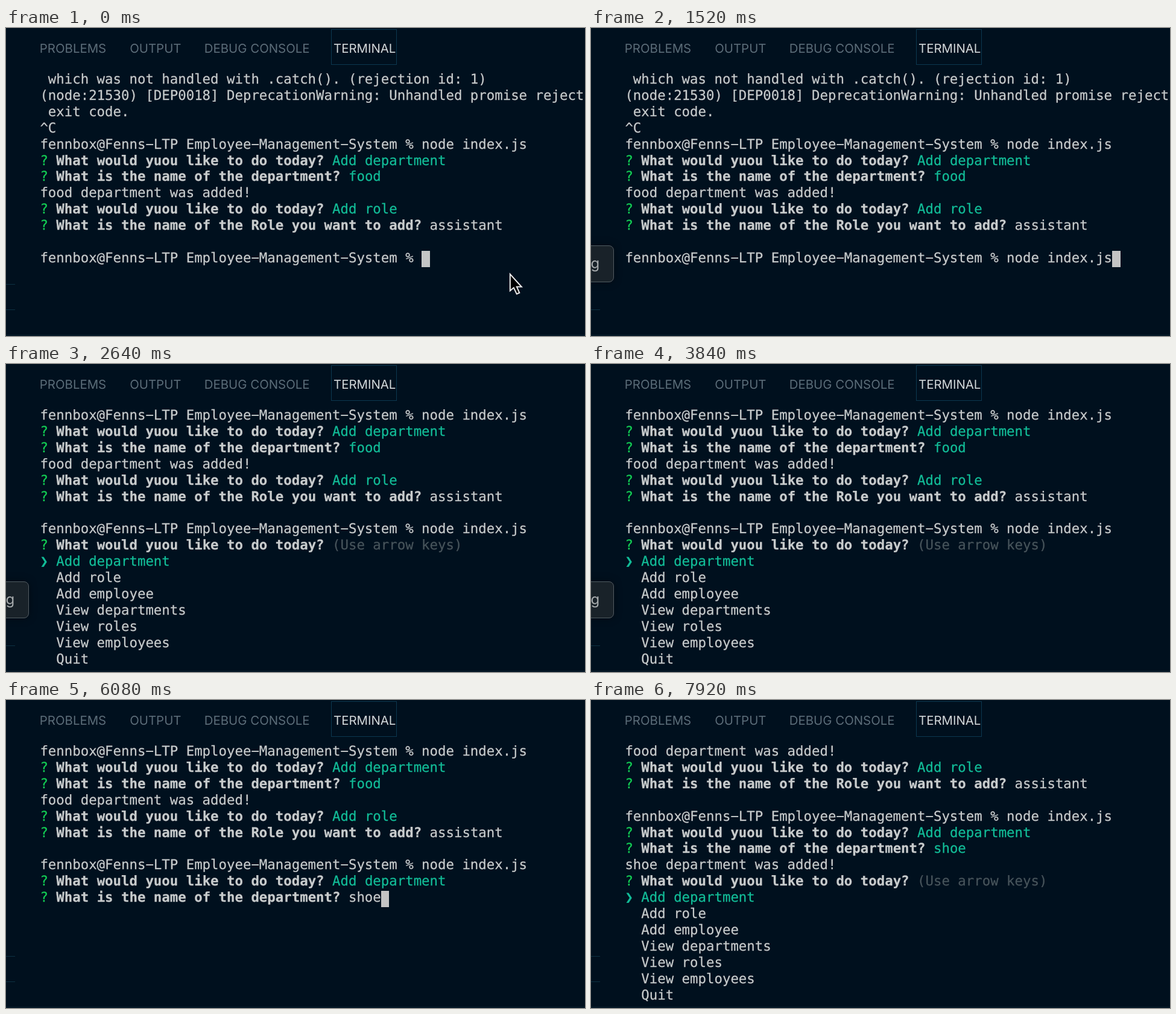
Recreate the animation shown at these times as an HTML page. Size 960 by 510 pixels, loop 8 s.

```html
<!DOCTYPE html>
<html lang="en">
<head>
<meta charset="utf-8">
<title>Terminal session</title>
<style>
  html, body { margin: 0; width: 100%; height: 100%; overflow: hidden; background: #00101e; }
  #stage { position: relative; width: 960px; height: 510px; overflow: hidden; background: #00101e;
    text-rendering: geometricPrecision; }
  #stage > *, .row, .block { position: absolute; }
  .tab { top: 21px; font: 20.4px/25px Inter, "Open Sans", sans-serif; color: #5c6d79; white-space: pre; }
  .on { color: #d4d8da; }
  #focus { left: 539px; top: 2px; width: 107px; height: 57px; border: 1px solid #0c3850; }
  .tick { left: 0; width: 15px; height: 1px; background: #0c3142; }
  #edge { left: 0; top: 508px; width: 960px; height: 1px; background: #0b2231; }
  #tip { left: -20px; top: 360px; width: 56px; height: 59px; border: 1px solid #535c62; border-radius: 8px;
    background: #192229; color: #a9adaf; font: 24px/58px Inter, sans-serif; box-shadow: 0 0 14px #0006; }
  #tip span { position: absolute; left: 18.5px; }
  #term { left: 56.4px; top: 72px; font: 22.37px/27px "DejaVu Sans Mono", monospace; color: #c8cbcc;
    -webkit-text-stroke: .25px; }
  .row { left: 0; white-space: pre; }
  .block { display: inline-block; width: 13.5px; height: 27px; top: 1.5px; background: #c4c4c4; }
  .green { color: #13cf55; }
  .teal { color: #12bd98; }
  .dim { color: #47545b; }
  #mouse { left: 0; top: 0; }
</style>
</head>
<body>
<div id="stage">
  <div class="tab" style="left:55.8px">PROBLEMS</div>
  <div class="tab" style="left:205.2px">OUTPUT</div>
  <div class="tab" style="left:328.8px">DEBUG CONSOLE</div>
  <div id="focus"></div>
  <div class="tab on" style="left:543px">TERMINAL</div>
  <div class="tick" id="upper" style="top:424px"></div>
  <div class="tick" style="top:466px"></div>
  <div id="edge"></div>
  <div id="term"></div>
  <div id="tip"><span>g</span></div>
  <svg id="mouse" width="30" height="42" viewBox="-3 -3 30 42">
    <path d="M0 0V27.5L6 22.5L11 33L15.5 31L11 21H19Z" fill="#000" stroke="#e8e8e8" stroke-width="2"/>
  </svg>
</div>
<script>
const LOOP = 8000, ROW = 26.9;
const $ = id => document.getElementById(id);
const paint = (cls, s) => `<span class="${cls}">${s}</span>`;
const block = '<span class="block"></span>';
const ask = (question, answer) => paint("green", "?") + ` <b>${question}</b> ${answer}`;

const today = answer => ask("What would yuou like to do today?", answer);
const dept = answer => ask("What is the name of the department?", answer);
const teal = s => paint("teal", s);
// the terminal face has wide hyphens
const prompt = "fennbox@Fenns-LTP Employee-Management-System % ".replace(/-/g, "\u2212");
const run = prompt + "node index.js";

const history = [
  " which was not handled with .catch(). (rejection id: 1)",
  "(node:21530) [DEP0018] DeprecationWarning: Unhandled promise reject",
  " exit code.",
  "^C",
  run,
  today(teal("Add department")),
  dept(teal("food")),
  "food department was added!",
  today(teal("Add role")),
  ask("What is the name of the Role you want to add?", "assistant"),
  ""
];
const menu = [
  today(paint("dim", "(Use arrow keys)")),
  teal("❯ Add department"),
  ...["Add role", "Add employee", "View departments", "View roles", "View employees", "Quit"].map(s => "  " + s)
];

// Returns the first visible row and the rows that follow the history
function session(t) {
  if (t < 1200) return [0, [prompt + block]];
  if (t < 1600) return [0, [run + block]];
  if (t < 1840) return [0, [run, block]];
  if (t < 4160) return [4, [run, ...menu]];
  const chosen = [run, today(teal("Add department"))];
  if (t < 6640) {
    const typed = Math.max(0, Math.min(4, Math.floor((t - 4960) / 240)));
    return [4, [...chosen, dept("shoe".slice(0, typed) + block)]];
  }
  return [7, [...chosen, dept(teal("shoe")), "shoe department was added!", ...menu]];
}

let shown = "";
function draw(t) {
  const [first, tail] = session(t);
  const html = [...history, ...tail].slice(first)
    .map((s, i) => `<div class="row" style="top:${(i * ROW).toFixed(2)}px">${s}</div>`).join("");
  if (html !== shown) $("term").innerHTML = shown = html;

  const hover = t >= 880 && t < 4080;
  $("tip").style.display = hover ? "block" : "none";
  $("upper").style.display = hover ? "none" : "block";

  const p = Math.max(0, Math.min(1, (t - 80) / 560));
  const e = p * p * (3 - 2 * p);
  $("mouse").style.transform = `translate(${832.8 - 880 * e}px, ${404.5 - 12 * e}px)`;
}

const start = performance.now();
function tick() {
  draw((performance.now() - start) % LOOP);
  requestAnimationFrame(tick);
}
tick();
</script>
</body>
</html>
```
